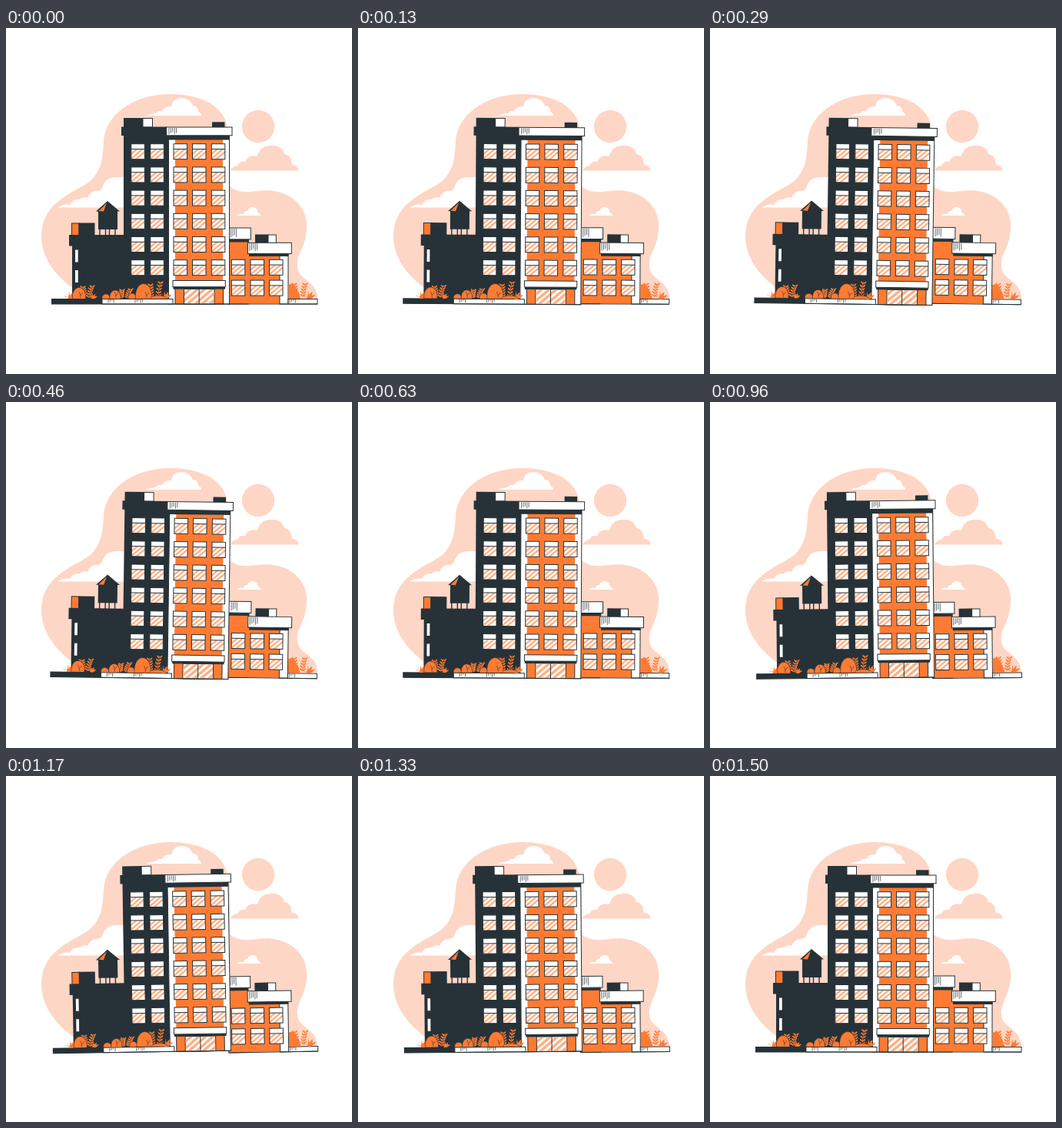
Animation of 450x450 px, one loop 1540 ms. Source, as an HTML page with a canvas:

```html
<!DOCTYPE html>
<html lang="en">
<head>
<meta charset="utf-8">
<title>Swaying buildings</title>
<style>
html, body { margin: 0; width: 100%; height: 100%; overflow: hidden; background: #fff; }
canvas { display: block; width: 450px; height: 450px; }
</style>
</head>
<body>
<canvas id="stage" width="450" height="450"></canvas>
<script>
const ctx = document.getElementById('stage').getContext('2d');
const DARK = '#263238', ORANGE = '#ff7b33', PEACH = '#fed6c5', GLARE = '#ffb084', WHITE = '#fff';
const LOOP = 1540, FPS = 24, SWAY = 1500;

function fill(path, color) {
  ctx.fillStyle = color;
  ctx.fill(new Path2D(path));
}

function line(path, color = DARK, width = 1) {
  ctx.strokeStyle = color;
  ctx.lineWidth = width;
  ctx.stroke(new Path2D(path));
}

// Boxes are given by their left, top, right and bottom edges.
function box(l, t, r, b, color) {
  ctx.fillStyle = color;
  ctx.fillRect(l, t, r - l, b - t);
}

function outline(l, t, r, b) {
  ctx.strokeStyle = DARK;
  ctx.lineWidth = 1;
  ctx.strokeRect(l, t, r - l, b - t);
}

function panel(l, t, r, b, color = WHITE) {
  box(l, t, r, b, color);
  outline(l, t, r, b);
}

function ticks(x, y, count, length) {
  for (let i = 0; i < count; i++) {
    line(`M${x + i * 2.4} ${y}v${length - (i % 3) * 1.3}`, DARK, 0.7);
  }
}

function glare(l, t, r, b, offsets, width) {
  ctx.save();
  ctx.beginPath();
  ctx.rect(l, t, r - l, b - t);
  ctx.clip();
  const h = b - t;
  for (const dx of offsets) line(`M${l + dx - 1} ${b + 1}l${h * 1.2 + 2} ${-h - 2}`, GLARE, width);
  ctx.restore();
}

function windowAt(x, y) {
  const r = x + 17.5, b = y + 20;
  box(x, y, r, b, WHITE);
  glare(x, y + 7, r, b, [-8, -1, 6], 2.3);
  line(`M${x} ${y + 6.8}H${r}`);
  outline(x, y, r, b);
}

function windowGrid(columns, top, rows, pitch) {
  for (let row = 0; row < rows; row++) {
    for (const x of columns) windowAt(x, top + row * pitch);
  }
}

function drawSky() {
  fill('M127 148C129 113 165 86 214 86C249 86 276 98 285 119L291 140V206' +
       'C307 219 324 210 344 211.500C373 214 391 234 391 256C392 284 377 294 379 311' +
       'C381 329 404 327 405 352H110C82 339 46 310 46 271C46 232 76 219 104 203' +
       'C125 190 126 166 127 148Z', PEACH);
  fill('M182 114Q189 111 195 111Q197 107 203 108Q206 101 215 102Q217 91 228 91' +
       'Q239 91 243 101Q250 101 250 109Q254 110 254 114Z', WHITE);
  fill('M67 233.500Q76 228 83 230Q87 222 96 223Q101 219 106 221Q110 211 119 212' +
       'Q124 211 125 208Q129 194 143 194H154V233.500Z', WHITE);
  fill('M299 244Q304 241 309 242Q310 238 314 238Q316 233 320 233Q326 233 327 238Q329 241 332 244Z', WHITE);
  ctx.fillStyle = PEACH;
  ctx.beginPath();
  ctx.arc(328, 128, 21.2, 0, Math.PI * 2);
  ctx.fill();
  fill('M292 185.500Q295 179 301 179Q304 173 311 174Q315 164 327 167Q330 153 345 153' +
       'Q359 152 362 164Q371 165 372 178Q380 178 381 185.500Z', PEACH);
}

function fern(x, base, height, lean) {
  line(`M${x} ${base}Q${x} ${base - height / 2} ${x + lean} ${base - height}`, ORANGE, 0.8);
  ctx.fillStyle = ORANGE;
  for (let i = 1; i <= 5; i++) {
    const p = i / 5, cx = x + lean * p * p, cy = base - height * p;
    for (const side of [-1, 1]) {
      ctx.beginPath();
      ctx.ellipse(cx + side * 2, cy + 1, 2.2, 0.9, -side * 0.75, 0, Math.PI * 2);
      ctx.fill();
    }
  }
}

function blades(x, base, size) {
  for (const a of [-1.1, -0.6, -0.1, 0.45, 1]) {
    const dx = Math.sin(a) * size, dy = -Math.cos(a) * size;
    fill(`M${x - 2} ${base}Q${x + dx * 0.3 - 1} ${base + dy * 0.7} ${x + dx} ${base + dy}` +
         `Q${x + dx * 0.7 + 1} ${base + dy * 0.3} ${x + 2} ${base}Z`, ORANGE);
  }
}

function mound(x, base, w, h) {
  const path = `M${x - w} ${base}C${x - w * 1.1} ${base - h * 0.6} ${x - w * 0.6} ${base - h} ${x} ${base - h}` +
    `C${x + w * 0.7} ${base - h} ${x + w * 1.1} ${base - h * 0.5} ${x + w} ${base}`;
  fill(path, ORANGE);
  line(path, DARK, 0.6);
}

function twig(x, base) {
  line(`M${x} ${base}q0 -5 -2 -8M${x} ${base - 3}l3 -4`, DARK, 0.6);
}

function drawLowBlock() {
  panel(85.5, 254, 95, 270, ORANGE);
  box(94.5, 253.5, 115.5, 270, DARK);
  box(86, 280, 154, 353, DARK);
  box(82, 269, 154, 283.5, DARK);
  box(90, 288.5, 93.7, 304.5, WHITE);
  box(90, 315, 93.7, 331, WHITE);

  box(120, 237, 145, 262, DARK);
  fill('M117 238.500L132 225L148 238.500Z', DARK);
  fill('M120.500 238L131 227.500L127 238.500Z', ORANGE);
  line('M122 261V270M129.500 261V270M134.500 261V270M142 261V270', DARK, 1.4);
}

function drawTower() {
  box(153, 117, 178.5, 130, DARK);
  panel(178, 117.5, 190.5, 129);
  box(268, 122.3, 284.5, 130, DARK);
  box(153, 138, 212, 359, DARK);
  panel(211.5, 140, 290.5, 359);
  box(220, 145, 282, 329, ORANGE);
  box(211, 139, 290.5, 145.5, DARK);
  box(150, 128.5, 209, 140, DARK);
  panel(208.5, 129, 294, 139.8);
  ticks(212, 130, 5, 8);

  windowGrid([162.8, 187.8], 150.7, 6, 30.2);
  windowGrid([218, 242.5, 267.3], 150.7, 6, 30.2);

  panel(220, 337, 282.5, 359, ORANGE);
  panel(231.5, 339.5, 271, 359);
  glare(232, 340, 270.5, 358.5, [-15, -5, 4, 14, 23, 33], 3.4);
  line('M251.200 339.500V359');
  box(217.5, 336, 285, 339.7, DARK);
  panel(217, 328.5, 285.3, 336.7);
}

function drawLeftGround() {
  box(59, 352, 126, 359, DARK);
  panel(125, 352.5, 217, 359);
  ticks(133, 353, 4, 4.5);
  ticks(168, 353, 5, 4.5);
  line('M59 359H291');
}

function drawLeftPlants() {
  blades(83, 352, 9);
  fern(102, 350, 14, -2);
  fern(108, 351, 16, 4);
  mound(95, 352, 8.5, 14.5);
  blades(113, 352, 7);
  mound(130, 352, 5, 6);
  fern(150, 351, 11, 1);
  fern(158, 351, 12, 4);
  mound(142, 352, 7, 11);
  mound(164, 352, 5, 7);
  fern(189, 350, 17, -1);
  fern(198, 351, 21, 3);
  mound(179, 352, 10.5, 19.5);
  blades(207, 352, 10);
  mound(198, 352, 10, 4);
  twig(97, 351);
  twig(143, 351);
  twig(183, 351);
}

function drawRightBlock() {
  panel(289, 276, 315, 359, ORANGE);
  box(289, 275, 316, 278.5, DARK);
  panel(289, 260, 318.3, 274.8);
  ticks(292.5, 261, 4, 11);
  box(324, 268.5, 341.5, 280, DARK);
  panel(341, 269, 351.3, 279.5);
  box(289, 294, 357, 358.5, ORANGE);
  panel(356, 294, 367, 359);
  box(316, 293, 367.5, 297, DARK);
  panel(314.5, 279.3, 371.3, 293.5);
  ticks(317, 280, 5, 10);
  windowGrid([293.3, 318, 342.5], 301.3, 2, 26.8);

  panel(367, 352.5, 405, 359);
  ticks(369, 353, 4, 4.5);
  line('M289 359H405');

  fill('M367.500 352V334Q375 330 378 340Q382 345 383 352Z', ORANGE);
  fern(377, 350, 18, -2);
  fern(386, 350, 18, 3);
  blades(394, 352, 10);
}

// Degrees: a triangle wave up to 1, down to -1 and back to rest.
function swayAngle(ms) {
  const p = ms % SWAY / SWAY;
  if (p < 0.25) return p * 4;
  return p < 0.75 ? 2 - p * 4 : p * 4 - 4;
}

function rotated(x, y, degrees, ...parts) {
  ctx.save();
  ctx.translate(x, y);
  ctx.rotate(degrees * Math.PI / 180);
  ctx.translate(-x, -y);
  for (const part of parts) part();
  ctx.restore();
}

function draw(now) {
  const step = Math.min(36, Math.floor((now % LOOP + 5) * FPS / 1000));
  const angle = swayAngle(step * 1000 / FPS);
  ctx.fillStyle = WHITE;
  ctx.fillRect(0, 0, 450, 450);
  drawSky();
  // Each group turns about its own centre.
  rotated(348, 309.5, angle, drawRightBlock);
  rotated(176.5, 238, angle, drawLowBlock, drawTower, drawLeftGround, drawLeftPlants);
}

let start;
function tick(now) {
  start ??= now;
  draw(now - start);
  requestAnimationFrame(tick);
}
draw(0);
requestAnimationFrame(tick);
</script>
</body>
</html>
```
